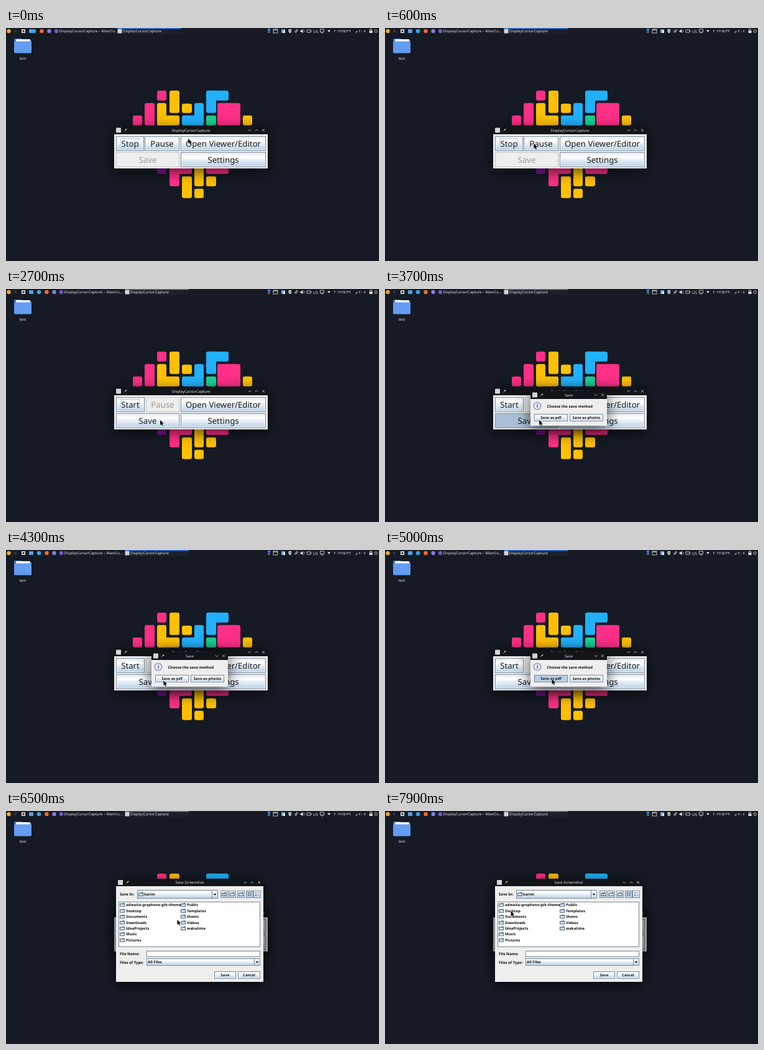
An HTML page with a canvas for the animation above (8 s loop, 600 px wide and 375 px high).

```html
<!DOCTYPE html>
<html lang="en">
<head>
<meta charset="utf-8">
<style>
html, body { margin: 0; width: 100%; height: 100%; overflow: hidden; background: #151a24; }
canvas { display: block; width: 600px; height: 375px; }
</style>
</head>
<body>
<canvas id="stage" width="600" height="375"></canvas>
<script>
const c = document.getElementById('stage').getContext('2d');
const LOOP = 8000, APP = 'DisplayCursorCapture';
const SANS = '"Noto Sans", "DejaVu Sans", sans-serif';
const PINK = '#ff2f87', GOLD = '#ffc004', BLUE = '#21b1fa', GREEN = '#17d394', PURPLE = '#80119a';
const EDGE = '#7a8a99', SOFT = '#b8cfe5', BAR = '#171b23';
c.textRendering = 'geometricPrecision';

// Pointer stops: time, x, y
const path = [[0, 293, 178], [250, 287, 180], [850, 211, 190], [1500, 211, 190], [2300, 248, 211],
  [4100, 248, 211], [4700, 268.5, 208], [5350, 268.5, 208], [5850, 286, 177], [6300, 286, 177],
  [7200, 202.5, 161], [8000, 202.5, 161]];

const ease = u => u * u * (3 - 2 * u);

function pointer(t) {
  const i = path.findIndex(p => p[0] > t), [t0, x0, y0] = path[i - 1], [t1, x1, y1] = path[i];
  const u = ease((t - t0) / (t1 - t0));
  return [x0 + (x1 - x0) * u, y0 + (y1 - y0) * u];
}

function box(x, y, w, h, fill) {
  c.fillStyle = fill;
  c.fillRect(x, y, w, h);
}

function frame(x, y, w, h, color = EDGE) {
  c.strokeStyle = color;
  c.lineWidth = 1;
  c.strokeRect(x + .5, y + .5, w - 1, h - 1);
}

function round(x, y, w, h, fill, r = 3) {
  c.fillStyle = fill;
  c.beginPath();
  c.roundRect(x, y, w, h, r);
  c.fill();
}

function dot(x, y, r, fill) {
  c.fillStyle = fill;
  c.beginPath();
  c.arc(x, y, r, 0, 7);
  c.fill();
}

function line(color, width, ...p) {
  c.strokeStyle = color;
  c.lineWidth = width;
  c.beginPath();
  for (let i = 0; i < p.length; i += 2) c.lineTo(p[i], p[i + 1]);
  c.stroke();
}

function poly(fill, ...p) {
  c.fillStyle = fill;
  c.beginPath();
  for (let i = 0; i < p.length; i += 2) c.lineTo(p[i], p[i + 1]);
  c.fill();
}

function text(s, x, y, { size = 6, color = '#111', bold = false, align = 'left' } = {}) {
  c.font = `${bold ? 'bold ' : ''}${size}px ${SANS}`;
  c.fillStyle = color;
  c.textAlign = align;
  c.fillText(s, x, y + size * .357);
}

const label = (s, x, y) => text(s, x, y, { bold: true });

function metal(x, y, w, h) {
  const g = c.createLinearGradient(0, y, 0, y + h);
  [[0, '#dde8f3'], [.3, '#fff'], [.6, '#dde8f3'], [1, SOFT]].forEach(s => g.addColorStop(...s));
  box(x, y, w, h, g);
}

function button(s, x, y, w, h, { off, down, focus, size = 13.2, bold = false } = {}) {
  if (off) box(x, y, w, h, '#eee');
  else if (down) box(x, y, w, h, down);
  else {
    metal(x, y, w, h);
    c.globalAlpha = .7;
    frame(x + 1, y + 1, w - 2, h - 2, '#fff');
    c.globalAlpha = 1;
  }
  frame(x, y, w, h, off ? '#c4c6c9' : EDGE);
  if (focus) frame(x + 7, y + 3, w - 15, h - 6, SOFT);
  text(s, x + w / 2, y + h / 2, { size, bold, align: 'center', color: off ? '#999' : '#1c1c1c' });
}

const small = (s, x, y, w, h, down) => button(s, x, y, w, h, { size: 6, bold: true, down });

function pin(x, y) {
  line('#ddd', 1.6, x, y, x + 2, y - 2);
  line('#ddd', .7, x - 2, y + 2, x, y);
}

function chevron(x, y, d) {
  line('#d5d7da', .8, x - 2.3, y - d, x, y + d, x + 2.3, y - d);
}

function cross(x, y) {
  line('#d5d7da', .8, x - 2, y - 2, x + 2, y + 2);
  line('#d5d7da', .8, x + 2, y - 2, x - 2, y + 2);
}

function panel(x, y, w, h, bar, title, max) {
  c.save();
  c.shadowColor = 'rgba(0,0,0,.65)';
  c.shadowBlur = 22;
  c.shadowOffsetY = 5;
  round(x, y, w, h, '#111419', [3, 3, 0, 0]);
  c.restore();
  box(x, y + bar, w, h - bar, '#eee');
  const m = y + bar / 2;
  round(x + 3, m - 4, 8, 8, '#d4d4d4', 1);
  pin(x + 18, m);
  text(title, x + w / 2, m, { color: '#e3e5e7', align: 'center' });
  cross(x + w - 7, m);
  if (max) chevron(x + w - 18, m, -1.2);
  chevron(x + w - (max ? 29 : 18), m, 1.2);
}

function wallpaper() {
  box(0, 0, 600, 375, '#151a24');
  [[243, 101, 15, 16, PINK], [263, 101, 16, 36, GOLD], [322, 101, 36, 16, BLUE], [322, 101, 16, 36, BLUE],
   [223, 121, 16, 36, PINK], [243, 121, 15, 36, GOLD], [243, 141, 36, 16, GOLD], [283, 122, 16, 15, GOLD],
   [303, 121, 15, 36, BLUE], [283, 141, 35, 16, BLUE], [322, 141, 16, 16, GREEN], [340, 121, 37, 36, PINK],
   [204, 141, 15, 16, PINK], [381, 141, 15, 16, GOLD], [243, 219, 15, 16, PURPLE], [263, 219, 36, 16, PINK],
   [263, 219, 16, 36, PINK], [303, 219, 15, 36, GOLD], [322, 219, 36, 16, PINK], [283, 239, 16, 35, GOLD],
   [303, 259, 15, 15, GOLD], [322, 239, 16, 16, GOLD]]
    .forEach(([x, y, ...rest]) => round(x, y - .3, ...rest));
  round(13, 17, 13, 8, '#3f75cc', 1.5);
  round(13, 19, 28, 21, '#3f75cc', 2);
  round(16, 18, 23, 8, '#f4f5f7', 1);
  round(13, 21.5, 28, 19, '#639cf0', 2);
  text('test', 27, 49, { color: '#e8eaed', align: 'center' });
}

function taskbar(t) {
  const pale = '#e2e4e7', u = 1 - ease(Math.min(t / 300, 1)), a = -8 * u, b = -12 * u;
  box(0, 0, 600, 10, BAR);
  box(191 + b, 0, 103, 10, '#1b2029');
  box(191 + b, 0, 103, 1.3, '#3b82f6');
  dot(4.5, 5, 3.2, '#f5a623');
  box(13, 3, 4, 4, '#30353d');
  box(25, 2, 6, 6, pale);
  box(26.5, 3.5, 3, 3, '#2a3038');
  round(37, 2, 7, 6, '#4da3ee', 1);
  dot(53 + a, 5, 3.3, '#35a4df');
  dot(65.5 + a, 5, 3.2, '#ff6a2b');
  dot(77.5 + a, 5, 3.2, '#7c83e8');
  dot(89 + a, 5, 3.2, '#7258c8');
  text(APP + ' – MainCo...', 93.5 + a, 5, { color: pale });
  round(191.5 + b, 1.5, 7, 7, '#d4d4d4', 1);
  text(APP, 200 + b, 5, { color: pale });

  box(421, 1, 4, 3.5, '#3b82f6');
  box(421, 5.5, 4, 2, '#7c8590');
  c.strokeStyle = pale;
  c.lineWidth = .8;
  c.strokeRect(430, 2, 7, 6);
  line(pale, 1, 430, 3, 437, 3);
  box(443, 2, 6, 6, '#6aa9f2');
  box(446, 4, 3, 4, '#f2f2f2');
  poly(pale, 454.5, 2, 459, 2, 459, 6, 457, 8.5, 454.5, 6);
  dot(456.8, 4.5, 1, BAR);
  line(pale, .8, 468.5, 3.5, 465.5, 7, 464.3, 6, 467.5, 2.2, 469.5, 3.2, 466, 7.8);
  poly(pale, 473.5, 3.8, 475, 3.8, 477.5, 1.7, 477.5, 8.3, 475, 6.2, 473.5, 6.2);
  line(pale, .7, 479, 3, 480, 5, 479, 7);
  c.lineWidth = .8;
  c.strokeRect(484, 3, 6, 4);
  box(490.5, 4, .8, 2, pale);
  text('US', 498, 5.3, { size: 6.3, color: pale, align: 'center' });
  c.strokeRect(505.5, 2, 6, 4.5);
  line(pale, .8, 507, 8, 510, 8);
  poly(pale, 517, 3.6, 522, 3.6, 519.5, 6.8);
  text('٢٠٢٢/٥/٢٩', 541, 5, { color: pale, align: 'center' });
  text('م', 564, 5, { color: pale, align: 'center' });
  text('٢:٠٧', 573, 5, { color: pale, align: 'center' });
  c.lineWidth = .8;
  c.strokeRect(585.5, 2, 3, 3);
  box(584.5, 4.5, 5, 3.5, pale);
  c.beginPath();
  c.arc(595, 5, 2.2, 0, 7);
  c.stroke();
}

function mainWindow(t) {
  const going = t < 950, saveDown = t >= 3200 && t < 3900;
  panel(174, 158, 247, 68, 13, APP, true);
  button(going ? 'Stop' : 'Start', 177, 174, going ? 45 : 46, 24,
    { focus: t < 3200, down: t > 850 && going && SOFT });
  button('Pause', going ? 223 : 225, 174, going ? 56 : 54, 24, { off: !going });
  button('Open Viewer/Editor', 281, 174, 137, 24);
  button('Save', 177, 200, 102, 24, { off: going, down: saveDown && '#a9bfd5' });
  button('Settings', 281, 200, 137, 24);
}

function saveDialog(t) {
  panel(234, 164, 123, 56, 13, 'Save', false);
  dot(245, 188, 6.3, '#6f7fb8');
  dot(245, 188, 5.2, '#e9ecf8');
  text('i', 245, 188, { size: 9, bold: true, align: 'center', color: '#4556a5' });
  label('Choose the save method', 260.5, 189);
  small('Save as pdf', 240, 201, 54, 12, t >= 4850 && t < 5300 && SOFT);
  small('Save as photos', 297, 201, 54, 12);
}

function folder(x, y) {
  round(x, y - 2.5, 8, 5.5, '#4a6684', .5);
  box(x + 1, y - 1.2, 6, 3.2, '#d5e4f3');
  box(x + 4.5, y - 3.2, 3, 1.2, '#4a6684');
}

function combo(s, x, y, w, h, pad) {
  metal(x, y, w, h);
  frame(x, y, w, h);
  frame(x + w - 10, y, 10, h);
  const m = y + h / 2;
  poly('#222', x + w - 7.5, m - 1, x + w - 2.5, m - 1, x + w - 5, m + 2);
  label(s, x + pad, m);
}

function fileChooser() {
  panel(177, 109, 237, 166, 12, 'Save Screenshot', true);
  label('Save In:', 183, 134);
  combo('karim', 211, 127, 130, 14, 11);
  folder(213, 134);
  [345, 358, 372, 386, 398].forEach((x, i) => {
    if (i === 3) box(x, 128, 12, 12, SOFT);
    else metal(x, 128, 12, 12);
    frame(x, 128, 12, 12);
    if (i < 3) folder(x + 2, 134);
    else for (let k = 0; k < 4; k++) {
      const wide = i === 4 && k % 2;
      box(x + 3 + (k % 2) * 3.5, 131 + (k >> 1) * 3.5, wide ? 3 : 2, wide ? 1 : 2, '#4d6a88');
    }
  });
  line('#4d6a88', 1, 351, 136, 351, 132, 349.5, 133.5);
  box(181, 146, 228, 73, '#fff');
  frame(181, 146, 228, 73);
  [['adwaita-graphene-gtk-theme', 'Desktop', 'Documents', 'Downloads', 'IdeaProjects', 'Music', 'Pictures'],
   ['Public', 'Templates', 'thems', 'Videos', 'wakatime']].forEach((names, col) =>
    names.forEach((s, row) => {
      const x = 183 + col * 98, y = 151.3 + row * 9.4;
      folder(x, y);
      label(s, x + 10, y);
    }));
  label('File Name:', 183, 230);
  box(226, 225, 183, 10, '#fff');
  frame(226, 225, 183, 10);
  label('Files of Type:', 183, 243.5);
  combo('All Files', 226, 237, 183, 12, 2);
  small('Save', 335, 258, 35, 12);
  small('Cancel', 373, 258, 36, 12);
}

function cursor(x, y) {
  c.save();
  c.translate(x, y);
  c.beginPath();
  [[0, 0], [0, 8], [1.9, 6.4], [3.2, 9.3], [4.6, 8.7], [3.4, 5.8], [5.8, 5.6]].forEach(p => c.lineTo(...p));
  c.closePath();
  c.strokeStyle = 'rgba(255,255,255,.6)';
  c.lineWidth = 1;
  c.stroke();
  c.fillStyle = '#0a0a0a';
  c.fill();
  c.restore();
}

const start = performance.now();

function draw(now) {
  const t = Math.max(0, now - start) % LOOP;
  wallpaper();
  taskbar(t);
  mainWindow(t);
  if (t >= 3400 && t < 5500) saveDialog(t);
  if (t >= 6100) {
    box(174, 158, 247, 68, 'rgba(0,0,0,.18)');
    fileChooser();
  }
  cursor(...pointer(t));
  requestAnimationFrame(draw);
}
requestAnimationFrame(draw);
</script>
</body>
</html>
```
